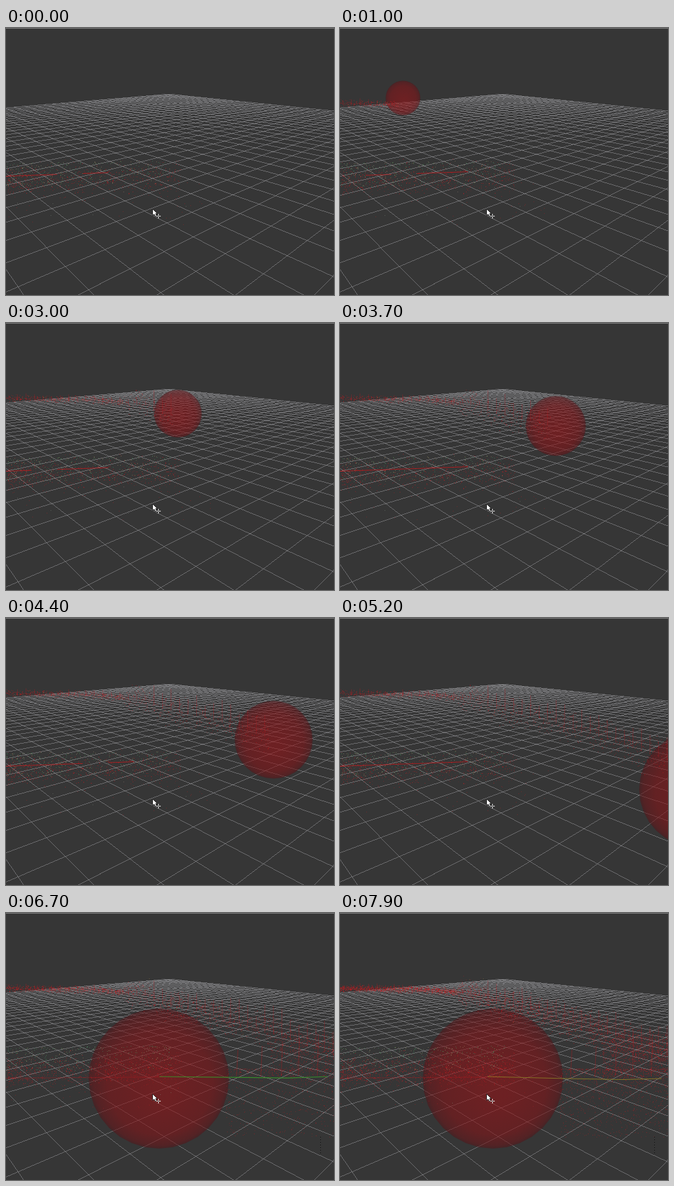
An HTML page with a canvas that plays this animation: 500x408 px, repeating every 8000 ms.

```html
<!DOCTYPE html>
<html lang="en">
<head>
<meta charset="utf-8">
<title>Point cloud mapping</title>
<style>
html, body { margin: 0; width: 100%; height: 100%; overflow: hidden; background: #363636; }
canvas { display: block; }
</style>
</head>
<body>
<canvas id="stage" width="500" height="408"></canvas>
<script>
const stage = document.getElementById('stage');
const ctx = stage.getContext('2d');
const LOOP = 8000, STEP = 100;

function random(seed) {
  let s = (seed * 2654435761) >>> 0;
  return () => {
    s = (s + 0x6D2B79F5) >>> 0;
    let r = Math.imul(s ^ (s >>> 15), 1 | s);
    r = (r + Math.imul(r ^ (r >>> 7), 61 | r)) ^ r;
    return ((r ^ (r >>> 14)) >>> 0) / 4294967296;
  };
}
const bell = rnd => rnd() + rnd() + rnd() - 1.5;
const clamp = v => Math.max(0, Math.min(1, v));

function line(x1, y1, x2, y2, color, width = 1) {
  ctx.strokeStyle = color;
  ctx.lineWidth = width;
  ctx.beginPath();
  ctx.moveTo(x1, y1);
  ctx.lineTo(x2, y2);
  ctx.stroke();
}

function dot(x, y, color, alpha) {
  ctx.globalAlpha = alpha;
  ctx.fillStyle = color;
  ctx.fillRect(Math.round(x), Math.round(y), 1, 1);
  ctx.globalAlpha = 1;
}

// Ground plane: both line families run to vanishing points on the horizon.
// Each line is named by the x where it meets the bottom of the stage.
const HORIZON = 53, LEFT_VP = -218, RIGHT_VP = 815, SPAN = RIGHT_VP - LEFT_VP;
const FAR_A = 3228, STEP_A = 106.7, FAR_B = -3376, STEP_B = 120.2;

function ground(a, b) {
  const t = SPAN / (SPAN + a - b);
  return [LEFT_VP + (a - LEFT_VP) * t, HORIZON + 355 * t];
}

// Hard one-pixel line without smoothing.
function pixelLine(g, [x1, y1], [x2, y2]) {
  const dx = x2 - x1, dy = y2 - y1;
  const steps = Math.ceil(Math.max(Math.abs(dx), Math.abs(dy)));
  for (let i = 0; i <= steps; i++) {
    const x = Math.floor(x1 + dx * i / steps), y = Math.floor(y1 + dy * i / steps);
    if (x >= 0 && x < 500 && y < 408) g.fillRect(x, y, 1, 1);
  }
}

function makeGrid() {
  const layer = document.createElement('canvas');
  layer.width = 500;
  layer.height = 408;
  const g = layer.getContext('2d'), near = SPAN / 1.3;
  g.fillStyle = 'rgba(160,160,164,.5)';
  for (let a = FAR_A; a > LEFT_VP; a -= STEP_A)
    pixelLine(g, ground(a, FAR_B), ground(a, SPAN + a - near));
  for (let b = FAR_B; b < RIGHT_VP; b += STEP_B)
    pixelLine(g, ground(FAR_A, b), ground(near - SPAN + b, b));
  return layer;
}
const grid = makeGrid();

// time, centre x, centre y, radius
const BALL = [
  [100, 20, 101, 25], [1000, 96, 107, 26.5], [1900, 173.5, 115.5, 30],
  [3000, 262, 138.5, 36.5], [4400, 408, 186, 59.5], [5200, 545, 262, 89],
  [5500, 600, 290, 110], [5700, 400, 275, 112], [5900, 239.5, 254, 106.5],
  [6300, 233, 253, 107], [7000, 233, 253, 107], [8000, 233, 253, 107]
];

function ballAt(time) {
  if (time < BALL[0][0]) return null;
  const k = Math.max(0, BALL.findIndex(key => key[0] > time) - 1);
  const slope = (n, c) => {
    const p = BALL[Math.max(0, n - 1)], q = BALL[Math.min(BALL.length - 1, n + 1)];
    return n === 6 || n >= 8 ? 0 : (q[c] - p[c]) / (q[0] - p[0]);
  };
  const p = BALL[k], q = BALL[k + 1], d = q[0] - p[0], u = (time - p[0]) / d;
  const [x, y, r] = [1, 2, 3].map(c =>
    p[c] * (1 + 2 * u) * (1 - u) ** 2 + q[c] * u * u * (3 - 2 * u) +
    d * (slope(k, c) * u * (1 - u) ** 2 - slope(k + 1, c) * u * u * (1 - u)));
  return { x, y, r };
}

function drawBall({ x, y, r }) {
  const shade = ctx.createRadialGradient(x + r * .06, y + r * .2, r * .15, x, y, r);
  shade.addColorStop(0, 'rgba(152,16,20,.56)');
  shade.addColorStop(.7, 'rgba(136,16,20,.55)');
  shade.addColorStop(.93, 'rgba(108,18,22,.54)');
  shade.addColorStop(1, 'rgba(80,20,24,.53)');
  ctx.fillStyle = shade;
  ctx.beginPath();
  for (let i = 0; i < 32; i++) {
    const angle = i * Math.PI / 16;
    ctx.lineTo(x + r * Math.cos(angle), y + r * Math.sin(angle));
  }
  ctx.fill();
}

// Cloud around the starting area, partly resampled at every step.
function drawStartCloud(time, tick) {
  const fixed = random(11), flicker = random(500 + tick);
  const late = time >= 5500, drop = late ? 10 : 0;
  const count = late ? 1200 + 1300 * clamp((time - 6000) / 1900) : 1150;
  for (let i = 0; i < count; i++) {
    const x = 265 * fixed() ** 1.3;
    const y = 234 + drop - x * .025 + bell(fixed) * 23;
    const alpha = .12 + .5 * fixed() ** 1.5;
    if (flicker() < .7) dot(x + flicker() * 3, y, '#d01a20', alpha);
  }
  for (let i = 0; i < 480; i++) {
    const x = 250 * fixed() ** 1.2, y = 206 + 36 * fixed() ** 1.4 - x * .015;
    const color = ['#4c9c5c', '#98a278', '#3f8f68', '#a08a60'][Math.floor(fixed() * 4)];
    if (flicker() < .65) dot(x + flicker() * 3, y, color, .5);
  }
  for (let i = 0; i < 90; i++) {
    const x = 320 * fixed(), y = 225 + 75 * fixed();
    if (flicker() < .5) dot(x, y, i % 8 ? '#b02024' : '#809080', .45);
  }
  if (late) {
    line(0, 252.5, 240, 250.5, 'rgba(205,25,30,.35)');
  } else {
    for (let x = 0; x < 195; x += 39)
      if (flicker() < .75)
        line(x, 226.5 - x * .035, x + 39, 225.1 - x * .035, 'rgba(215,20,25,.7)');
  }
}

const TRACK = [[0, 115], [130, 117], [215, 124], [235, 136], [300, 150], [350, 165], [420, 188], [500, 216]];

function trackY(x) {
  const n = Math.max(1, TRACK.findIndex(p => p[0] >= x));
  const [x1, y1] = TRACK[n - 1], [x2, y2] = TRACK[n];
  return y1 + (y2 - y1) * (x - x1) / (x2 - x1);
}

// Points stay behind along the path once the ball has gone by.
function drawTrack(time, tick, ball) {
  const reach = time >= 5200 ? 500 : ball.x - 8;
  const growth = clamp((time - 5900) / 2000);
  const count = time < 5500 ? 2000 : 1600 + 4400 * growth;
  const fixed = random(29), flicker = random(900 + tick);
  for (let i = 0; i < count; i++) {
    const x = 500 * fixed(), spread = x < 180 ? 5 : 11 + x * .04;
    const y = trackY(x) + bell(fixed) * spread;
    const alpha = .12 + .5 * fixed() ** 1.3;
    if (x < reach && flicker() < .72)
      dot(x, y, i % 24 ? '#d0181e' : '#8c7a40', alpha);
  }
  for (let x = 4; x < 500; x += 13) {
    const height = (x < 220 ? 6 : 10 + x * .05) * (.6 + .8 * fixed());
    if (x < reach) {
      const y = trackY(x);
      line(x + .5, y - height, x + .5, y + 2, 'rgba(180,28,32,.35)');
    }
  }
}

function drawReturn(time, tick) {
  const growth = clamp((time - 5900) / 2000);
  const fixed = random(47), flicker = random(1300 + tick);
  for (let i = 0; i < 550 + 1300 * growth; i++) {
    const x = 335 + 165 * fixed(), y = 238 + 105 * fixed() ** 2.1;
    const alpha = .15 + .4 * fixed();
    if (flicker() < .75) dot(x, y, '#bd1c22', alpha);
  }
  for (let i = 0; i < 1300 * growth; i++) {
    const x = 400 + 100 * fixed(), y = 220 + bell(fixed) * 40;
    if (flicker() < .75) dot(x, y, '#c41c22', .38);
  }
  [353, 390, 421, 447, 476].forEach((x, i) =>
    line(x + .5, 209 - i * 6, x - 1.5, 249, 'rgba(175,28,32,.45)'));
  for (let y = 342; y < 370; y += 4) dot(479, y, '#080808', .9);
}

function drawLink(time) {
  const shift = clamp((time - 5900) / 2000);
  ctx.strokeStyle = shift > .5 ? 'rgba(142,128,38,.85)' : 'rgba(55,155,42,.85)';
  ctx.lineWidth = 1.2;
  ctx.beginPath();
  ctx.moveTo(240 - 15 * shift, 250);
  ctx.lineTo(345, 250 + 3 * shift);
  ctx.lineTo(430, 250.5 + 4 * shift);
  ctx.lineTo(490, 248 + 5 * shift);
  ctx.stroke();
}

function drawCursor() {
  ctx.save();
  ctx.translate(223.5, 276.5);
  ctx.fillStyle = '#fff';
  ctx.strokeStyle = '#111';
  ctx.lineWidth = .8;
  const arrow = new Path2D('M0 0V10L2.4 8L4 11.4L6 10.5L4.5 7.2H7.3Z');
  ctx.fill(arrow);
  ctx.stroke(arrow);
  ctx.restore();
  line(229, 287.5, 236, 287.5, '#e0e0e0');
  line(232.5, 284, 232.5, 291, '#e0e0e0');
  dot(232, 287, '#222', 1);
}

function draw(time) {
  const tick = Math.floor(time / STEP), now = tick * STEP;
  const ball = ballAt(now);
  ctx.fillStyle = '#363636';
  ctx.fillRect(0, 0, 500, 408);
  ctx.drawImage(grid, 0, 0);
  if (ball) drawBall(ball);
  drawStartCloud(now, tick);
  if (ball) drawTrack(now, tick, ball);
  if (now >= 5500) {
    drawReturn(now, tick);
    drawLink(now);
  }
  ctx.fillStyle = '#7c7c7c';
  ctx.fillRect(0, 0, 500, 1);
  drawCursor();
}

const start = performance.now();
function frame() {
  draw((performance.now() - start) % LOOP);
  requestAnimationFrame(frame);
}
frame();
</script>
</body>
</html>
```
